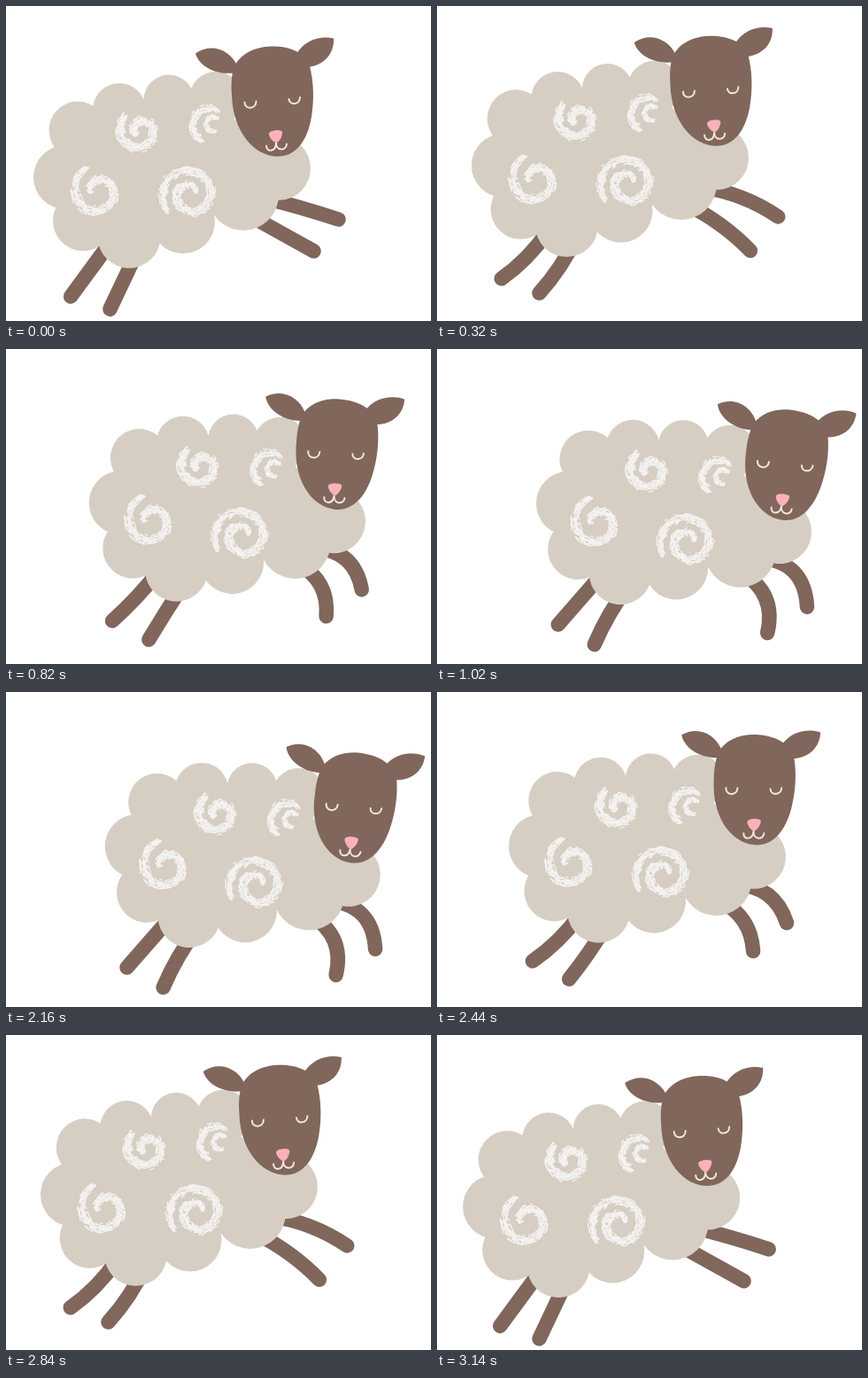
Animation, 480 px wide and 355 px high, one loop 3.16 s. Source, as an HTML page with a canvas:

```html
<!DOCTYPE html>
<html lang="en">
<head>
<meta charset="utf-8">
<title>Leaping sheep</title>
<style>
html, body { margin: 0; width: 100%; height: 100%; overflow: hidden; background: #fff; }
canvas { display: block; }
</style>
</head>
<body>
<canvas id="stage" width="480" height="355"></canvas>
<script>
const ctx = document.getElementById('stage').getContext('2d');
const BROWN = '#80665b', WOOL = '#d6cec3', CHALK = '#f4f2f0', CREAM = '#f3e7d8', PINK = '#fbb1ba';
const LOOP = 3160, LEAP = 1020, BACK = 2160, STEP = 20;
const PIVOT = { x: 190, y: 190 };

// Crouch, push off, top of the leap, fall, landing
const PATH = [
  { t: 0, x: 190, y: 190 },
  { t: 80, x: 183.2, y: 192 },
  { t: 400, x: 206.3, y: 173.8 },
  { t: 720, x: 239.8, y: 182 },
  { t: LEAP, x: 269.6, y: 192.4 }
];

// Swing in degrees, reach and bend go from the first value to the second;
// wave stretches then tucks the leg, lift and curl swing it back in mid-leap
const FRONT = { wave: 8, lift: 0, curl: 0 };
const HIND = { wave: 0, lift: 13, curl: 0.13 };
const LEGS = [
  { ...FRONT, hip: [290, 216], swing: [16, 35.5], reach: [89, 77.6], bend: [0.02, 0.44] },
  { ...FRONT, hip: [275, 236], swing: [29, 57.6], reach: [83, 73], bend: [0, 0.36] },
  { ...HIND, hip: [117.5, 267], swing: [126.3, 121.2], reach: [75, 73], bend: [0, 0] },
  { ...HIND, hip: [150, 273], swing: [115.4, 110], reach: [76, 76], bend: [0, -0.06] }
];

// Lobes of the fleece in order round the body: x, y, radius
const LOBES = [
  [67, 193, 36], [81, 140, 32.5], [128, 117, 30], [184, 106, 28.5], [237, 104, 30],
  [308, 183, 36], [268, 213, 40], [200, 243, 36], [139, 260, 35.5], [87, 242, 34]
];

const rad = deg => deg * Math.PI / 180;
const smooth = p => p * p * (3 - 2 * p);
const mix = ([a, b], p) => a + (b - a) * p;

function seeded(seed) {
  return () => {
    seed = (seed * 1664525 + 1013904223) % 4294967296;
    return seed / 4294967296;
  };
}

// Smooth curve through the path points, at rest on landing
function along(axis, t) {
  const last = PATH.length - 1;
  const speed = i => (PATH[i + 1][axis] - PATH[i][axis]) / (PATH[i + 1].t - PATH[i].t);
  const slope = i => {
    if (i === 0) return speed(0);
    if (i === last) return 0;
    const before = PATH[i].t - PATH[i - 1].t, after = PATH[i + 1].t - PATH[i].t;
    return (speed(i - 1) * after + speed(i) * before) / (before + after);
  };
  let i = 0;
  while (i < last - 1 && t > PATH[i + 1].t) i++;
  const a = PATH[i], b = PATH[i + 1], h = b.t - a.t, s = (t - a.t) / h, r = 1 - s;
  return mix([a[axis], b[axis]], smooth(s)) + h * s * r * (slope(i) * r - slope(i + 1) * s);
}

function fleecePath() {
  const p = new Path2D();
  LOBES.forEach(([x, y], i) => i ? p.lineTo(x, y) : p.moveTo(x, y));
  p.closePath();
  for (const [x, y, r] of LOBES) {
    const lobe = new Path2D();
    lobe.arc(x, y, r, 0, 2 * Math.PI);
    p.addPath(lobe);
  }
  return p;
}

// Dry brush along a spiral: parallel bristles, broken more often at the edges
const chalk = new Path2D();
const rand = seeded(7);
function swirl(x, y, r0, r1, from, to, width) {
  const n = Math.round(width * 1.3), dir = Math.sign(to - from);
  for (let k = 0; k < n; k++) {
    const off = (k + 0.5) / n - 0.5;
    const gap = 0.1 + 1.8 * off * off;
    const stop = to - dir * rand() * 60 * Math.abs(off);
    let a = from + dir * rand() * 40 * Math.abs(off);
    let on = false;
    while ((stop - a) * dir > 0) {
      const s = (a - from) / (to - from);
      const thin = Math.min(1, 0.55 + s * 4, 0.5 + (1 - s) * 2);
      const r = mix([r0, r1], s) + off * width * thin + (rand() - 0.5) * 1.8;
      const px = x + r * Math.cos(rad(a)), py = y + r * Math.sin(rad(a));
      const draw = rand() > gap;
      if (draw) chalk[on ? 'lineTo' : 'moveTo'](px, py);
      on = draw;
      a += dir * (4 + rand() * 5);
    }
  }
}
swirl(104, 209, 29.5, 8, -112, -560, 11);
swirl(151.5, 141, 24.5, 5, -130, -600, 11);
swirl(230, 133.5, 20, 18, 108, 312, 9);
swirl(234, 133, 8, 8, 60, 325, 6);
swirl(208, 212.5, 33, 7, 138, 710, 11);

const fleece = fleecePath();
const head = new Path2D('M257 70C266 50 287 45.5 301 45.5C319 45.5 336 51 342.5 66C348 85 348 107 345 125C340 154 326 169.5 307 169.5C280 169.5 256 141 255 100C254 88 255 78 257 70Z');
const ears = new Path2D('M260 65C252 50 232 41 214 53.5C218 68 238 79 260 75ZM328 54C337 39 354 33 370 36.5C371 53 360 67 340 69Z');
const face = new Path2D('M269.5 108.5C269.5 117 282.5 117 282.5 107.5M319.5 105C320.5 112.5 332 111.5 332 103M294 157.5C294 165 305 165 305 154C305 164 317 163.5 317 155.5');
const nose = new Path2D('M297 143.5C299 140 309 139 312 141.5C313 146 308 154.5 305 154C302 153.5 296 147 297 143.5Z');

function drawLeg(leg, p) {
  const ease = smooth(p), arch = Math.sin(Math.PI * p) ** 2;
  const angle = rad(mix(leg.swing, ease) + leg.lift * arch);
  const reach = mix(leg.reach, ease) + leg.wave * Math.sin(2 * Math.PI * p);
  const bend = mix(leg.bend, ease) + leg.curl * arch;
  const [x, y] = leg.hip;
  const dx = reach * Math.cos(angle), dy = reach * Math.sin(angle);
  ctx.beginPath();
  ctx.moveTo(x, y);
  ctx.quadraticCurveTo(x + dx / 2 + bend * dy, y + dy / 2 - bend * dx, x + dx, y + dy);
  ctx.stroke();
}

function draw(t) {
  const p = t / LEAP;
  ctx.fillStyle = '#fff';
  ctx.fillRect(0, 0, 480, 355);
  ctx.lineCap = ctx.lineJoin = 'round';

  ctx.save();
  ctx.translate(along('x', t), along('y', t));
  ctx.rotate(rad(10 * smooth(p ** 1.9)));
  ctx.translate(-PIVOT.x, -PIVOT.y);

  ctx.strokeStyle = BROWN;
  ctx.lineWidth = 16.5;
  for (const leg of LEGS) drawLeg(leg, p);

  ctx.fillStyle = WOOL;
  ctx.fill(fleece);
  ctx.strokeStyle = CHALK;
  ctx.lineWidth = 1.3;
  ctx.stroke(chalk);

  ctx.fillStyle = BROWN;
  ctx.fill(ears);
  ctx.fill(head);
  ctx.strokeStyle = CREAM;
  ctx.lineWidth = 2;
  ctx.stroke(face);
  ctx.fillStyle = PINK;
  ctx.fill(nose);
  ctx.restore();
}

// Leap forward, rest, then the same way back
function leapTime(ms) {
  const t = Math.floor(ms % LOOP / STEP) * STEP;
  return t < BACK ? Math.min(t, LEAP) : LOOP - t;
}

const start = performance.now();
function tick() {
  draw(leapTime(performance.now() - start));
  requestAnimationFrame(tick);
}
tick();
</script>
</body>
</html>
```
